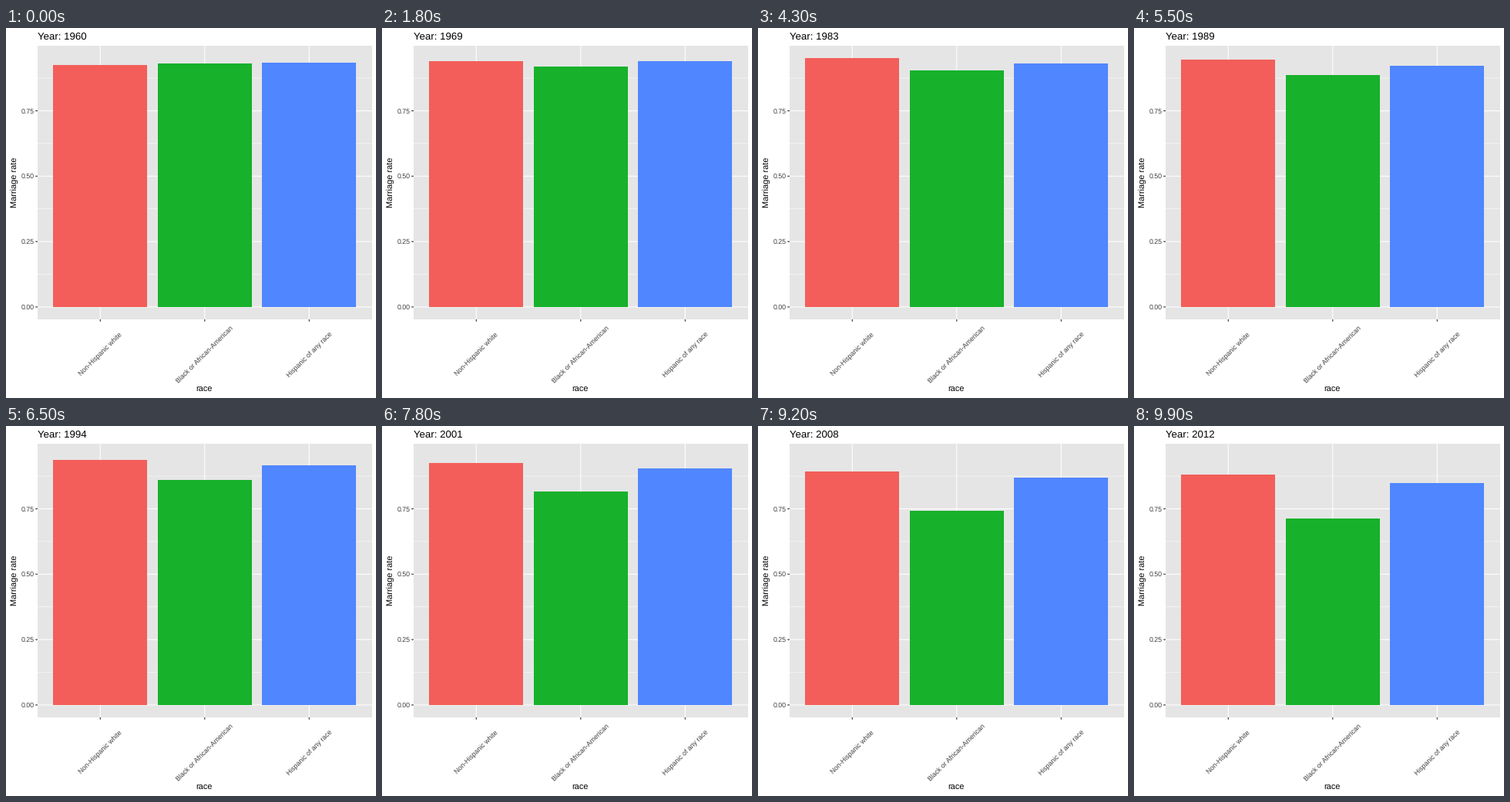
A matplotlib script for the animation above (10 s loop, 480 by 480 pixels).

```python
import numpy as np
import matplotlib.pyplot as plt
from matplotlib.animation import FuncAnimation
from matplotlib.patches import Rectangle

SIZE, DPI = 480, 100
FRAMES, INTERVAL = 100, 100
PX = 72 / DPI  # points per pixel

plt.rcParams["font.family"] = "Liberation Sans"
plt.rcParams["text.hinting"] = "none"

LEFT, RIGHT, TOP, BOTTOM = 41, 475, 23, 378
ZERO, UNIT = 361.9, 339.3  # pixel row of rate 0, pixels per unit of rate
STEP = 135.5               # distance between bar centres
TICK, TICK_TEXT = "#262626", "#3E3E3E"

# Marriage rates at the key years, linear in between.
YEARS = (1960, 1970, 1980, 1990, 2001, 2006, 2012)
GROUPS = (
    ("Non-Hispanic white", "#F35E5A",
     (0.9263, 0.9421, 0.9517, 0.9466, 0.9245, 0.9004, 0.8809)),
    ("Black or African-American", "#17B12B",
     (0.9297, 0.9201, 0.9128, 0.8848, 0.8164, 0.7630, 0.7118)),
    ("Hispanic of any race", "#5086FF",
     (0.9328, 0.9405, 0.9334, 0.9222, 0.9045, 0.8827, 0.8485)),
)

fig = plt.figure(figsize=(SIZE / DPI, SIZE / DPI), dpi=DPI, facecolor="white")
ax = fig.add_axes((0, 0, 1, 1))
ax.set(xlim=(0, SIZE), ylim=(SIZE, 0))
ax.axis("off")


def rect(x0, y0, x1, y1, color, z):
    patch = Rectangle((x0, y0), x1 - x0, y1 - y0, fc=color, ec="none", lw=0,
                      antialiased=False, zorder=z)
    return ax.add_patch(patch)


def line(xs, ys, color="white", width=1.07):
    ax.plot(xs, ys, color=color, lw=width * PX, solid_capstyle="butt",
            snap=False, zorder=2)


def text(x, y, s, size, color="black", **kw):
    return ax.text(x, y, s, fontsize=size * PX, color=color, zorder=5, **kw)


def y_at(rate):
    return ZERO - UNIT * rate


rect(LEFT, TOP, RIGHT, BOTTOM, "#E5E5E5", 1)

for v in np.arange(0, 1, 0.25):
    y, minor = y_at(v), y_at(v + 0.125)
    line((LEFT, RIGHT), (minor, minor), width=0.53)
    line((LEFT, RIGHT), (y, y))
    line((LEFT - 2.75, LEFT), (y, y), TICK)
    text(36.4, y + 3.15, f"{v:.2f}", 8.8, TICK_TEXT, ha="right")

bars = []
for i, (label, color, _) in enumerate(GROUPS):
    x = LEFT + STEP * (i + 0.6)
    line((x, x), (TOP, BOTTOM))
    line((x, x), (BOTTOM, BOTTOM + 2.75), TICK)
    text(x + 0.6, 423.7, label, 8.8, TICK_TEXT, ha="center", va="center",
         rotation=45)
    bars.append(rect(round(x - 0.45 * STEP), TOP, round(x + 0.45 * STEP),
                     round(ZERO), color, 3))

text(257, 472.2, "race", 11, ha="center")
text(14.4, 200.5, "Marriage rate", 11, ha="center", rotation=90,
     rotation_mode="anchor")
title = text(LEFT, 15, "", 13.2)


def update(frame):
    year = np.interp(frame, (0, FRAMES - 1), (YEARS[0], YEARS[-1]))
    title.set_text(f"Year: {year:.0f}")
    for bar, (_, _, rates) in zip(bars, GROUPS):
        top = round(y_at(np.interp(year, YEARS, rates)))
        bar.set_y(top)
        bar.set_height(round(ZERO) - top)
    return [title, *bars]


anim = FuncAnimation(fig, update, frames=FRAMES, interval=INTERVAL,
                     repeat=True, repeat_delay=0, blit=False)
plt.show()
```
